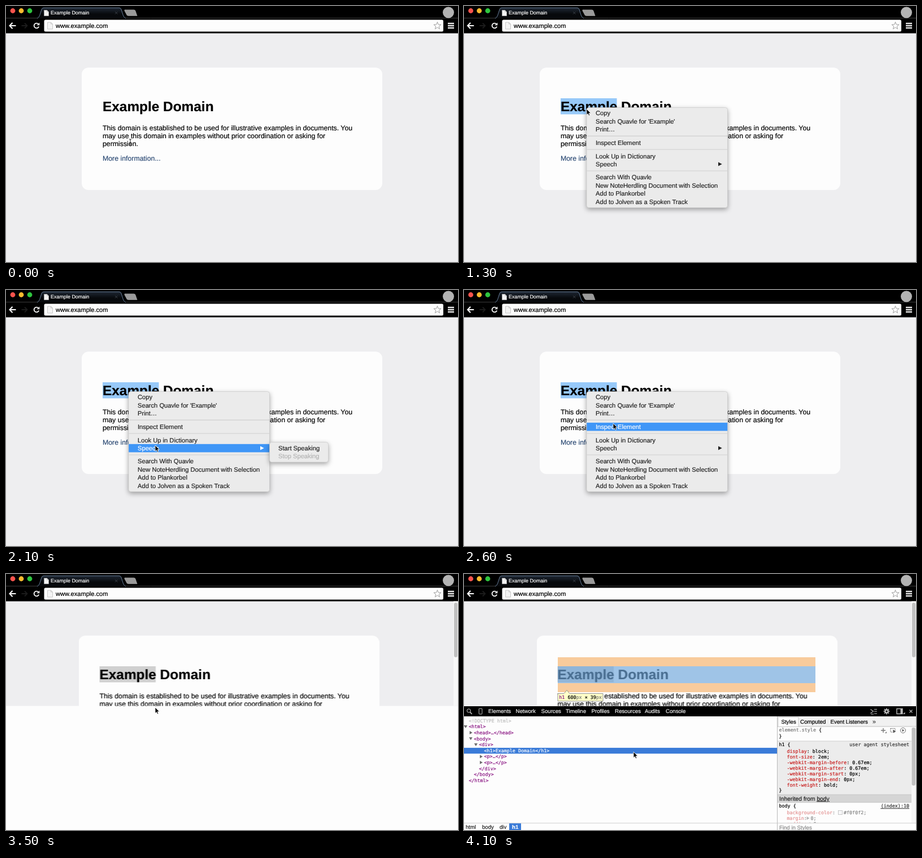
Write an HTML page that moves like this. It is 800 px wide and 455 px high and loops after 4.2 s.

```html
<!DOCTYPE html>
<html lang="en">
<head>
<meta charset="utf-8">
<title>Inspect Element</title>
<style>
  html, body { margin: 0; width: 100%; height: 100%; overflow: hidden; background: #eeeef0; }
  svg { display: block; width: 800px; height: 455px; }
  text {
    font-family: "Liberation Sans", Arial, sans-serif; white-space: pre;
    text-rendering: geometricPrecision;
    fill: currentColor; stroke: currentColor; stroke-width: .2px;
  }
  .mono { font-family: "DejaVu Sans Mono", Menlo, monospace; font-size: 8.37px; }
  .menu { filter: drop-shadow(0 3px 4px rgba(0, 0, 0, .35)); }
</style>
</head>
<body>
<svg id="stage" viewBox="0 0 800 455">
  <defs>
    <linearGradient id="tab" x2="0" y2="1">
      <stop offset="0" stop-color="#1f2834"/><stop offset=".6" stop-color="#07090c"/>
    </linearGradient>
    <clipPath id="styles"><path d="M554 253H800V442.5H554z"/></clipPath>
  </defs>
  <g id="page"></g>
  <g id="chrome"></g>
  <g id="blank"></g>
  <g id="tools"></g>
  <g id="menu"></g>
  <g id="sub"></g>
  <g id="ibeam">
    <path d="M-2-5.5Q0-5.5 0-4Q0-5.5 2-5.5M0-4V4M-2 5.5Q0 5.5 0 4Q0 5.5 2 5.5M-1.3 1.8H1.3" fill="none" stroke="#222"/>
  </g>
  <g id="arrow">
    <path d="M0 0V10.6L2.4 8.4 4 12 5.8 11.2 4.2 7.7H7.5z" fill="#000" stroke="#fff" stroke-width=".8"/>
  </g>
</svg>
<script>
const LOOP = 4200, TICK = 100;
const $ = id => document.getElementById(id);
const put = (id, ...parts) => { $(id).innerHTML = parts.flat().join(''); };

const rect = (x, y, w, h, fill, more = '') =>
  `<rect x="${x}" y="${y}" width="${w}" height="${h}" fill="${fill}" ${more}/>`;
const path = (d, fill, stroke = 'none', width = 1) =>
  `<path d="${d}" fill="${fill}" stroke="${stroke}" stroke-width="${width}"/>`;
const dot = (x, y, r, fill) => `<circle cx="${x}" cy="${y}" r="${r}" fill="${fill}"/>`;
const ring = (x, y, r, stroke) => `<circle cx="${x}" cy="${y}" r="${r}" fill="none" stroke="${stroke}"/>`;
const text = (x, y, s, size, color = '#000', more = '') =>
  `<text x="${x}" y="${y}" font-size="${size}" color="${color}" ${more}>${s}</text>`;
const mono = (x, y, s, color = '#000', more = '') =>
  `<text class="mono" x="${x}" y="${y}" color="${color}" ${more}>${s}</text>`;
const span = (s, color) => `<tspan color="${color}">${s}</tspan>`;
const esc = s => s.replace(/</g, '&lt;').replace(/>/g, '&gt;');

// Browser window
const docIcon = (x, y, w, h) =>
  path(`M${x} ${y}h${w - 3}l3 3v${h - 3}h${-w}z`, '#f4f4f4', '#b5b5b5', .7) +
  path(`M${x + w - 3} ${y}v3h3`, 'none', '#b5b5b5', .7);

const star = Array.from({ length: 10 }, (_, i) => {
  const r = i % 2 ? 2.9 : 6.8, a = i * Math.PI / 5;
  return `${(763.5 + r * Math.sin(a)).toFixed(1)} ${(35.2 - r * Math.cos(a)).toFixed(1)}`;
}).join('L');

put('chrome',
  rect(0, 0, 800, 48.5, '#000'),
  path('M0 21.5H800', 'none', '#3c3c3c'),
  dot(12, 8.5, 4.4, '#f9544d'), dot(27, 8.5, 4.4, '#fcbb2f'), dot(42, 8.5, 4.4, '#2fc63f'),
  path('M55 22Q58 21 59.5 17L63 6Q64 3.2 67 3.2H200Q203 3.2 204 6L207.5 17Q209 21 212 22', 'url(#tab)', '#7189a8', .9),
  docIcon(67.5, 7.5, 8, 10),
  text(79, 15.3, 'Example Domain', 8.97, '#fff'),
  path('M193 10l4.5 4.5m0-4.5l-4.5 4.5', 'none', '#3a4048'),
  path('M210 6.5H226Q228.5 6.5 229.3 8.5L232.5 17.8H217Q214 17.8 213 15L209.3 8z', '#9b9b9b'),
  path('M11.5 29.8L6.5 35L11.5 40.2M6.5 35H17.5', 'none', '#fff', 2.1),
  path('M33 30.5L37.5 35L33 39.5M27.5 35H37', 'none', '#1c1c1c', 1.8),
  path('M57.3 32A4.4 4.4 0 1 0 58.2 36.5', 'none', '#fff', 1.8),
  path('M59.3 29.5V34.3H54.5z', '#fff'),
  rect(67.5, 24.5, 706.5, 21, '#fdfdfd', 'rx="2.5"'),
  docIcon(73.5, 29, 9, 12),
  text(88, 39, 'www.example.com', 11.1),
  path(`M${star}z`, '#fff', '#909090', .9),
  path('M782 31H793M782 35H793M782 39H793', 'none', '#e6e6e6', 2.3),
  dot(783, 11.5, 10, '#b3b3b3'));

// Web page
const copy = [
  'This domain is established to be used for illustrative examples in documents. You',
  'may use this domain in examples without prior coordination or asking for',
  'permission.'
];
put('page',
  rect(134, 109.5, 532, 217.5, '#fdfdfd', 'rx="12"'),
  rect(171, 164, 99.5, 28.5, '#97c9f9', 'id="pick"'),
  text(171, 187.3, 'Example Domain', 24.4, '#000', 'font-weight="bold"'),
  copy.map((s, i) => text(171, 221.3 + i * 13.68, s, 12.32)),
  text(171, 274.7, 'More information...', 12.32, '#2c4a74'));

put('blank',
  rect(0, 234.5, 800, 221, '#fdfdfd'),
  rect(792, 48.5, 8, 186, '#f8f8f8'),
  rect(793, 51, 6, 97, '#c0c0c0', 'rx="3"'));

// Developer tools
const TAG = '#881280', PROP = '#c81c1c', BLUE = '#3a7bd8';

const tabs = [[43, 'Elements'], [91.5, 'Network'], [136.5, 'Sources'], [180, 'Timeline'],
  [225.5, 'Profiles'], [267, 'Resources'], [320, 'Audits'], [357, 'Console']];

// indent level, text, fold: 'o'pen, 'c'losed or none
const tree = [
  [0, '<!DOCTYPE html>', ''], [0, '<html>', 'o'], [1, '<head>…</head>', 'c'], [1, '<body>', 'o'],
  [2, '<div>', 'o'], [3, '<h1>Example Domain</h1>', ''], [3, '<p>…</p>', 'c'], [3, '<p>…</p>', 'c'],
  [2, '</div>', ''], [1, '</body>', ''], [0, '</html>', '']
];
const fold = (x, y, kind) =>
  kind === 'o' ? path(`M${x - 3} ${y - 2.2}h6l-3 5z`, '#6b6b6b') :
  kind === 'c' ? path(`M${x - 2} ${y - 3}v6l5-3z`, '#6b6b6b') : '';

const treeRow = ([level, s, kind], i) => {
  const x = 8.4 + level * 9.05, y = 260.6 + i * 10.64, on = i === 5;
  return (on ? rect(0, y - 4.9, 554, 10.4, BLUE) : '') + fold(x - 5.5, y, kind) +
    mono(x, y + 3, esc(s), on ? '#fff' : i ? TAG : '#bdbdbd');
};

const rules = ['display: block', 'font-size: 2em', '-webkit-margin-before: 0.67em',
  '-webkit-margin-after: 0.67em', '-webkit-margin-start: 0px', '-webkit-margin-end: 0px', 'font-weight: bold'];
const rule = (s, i) => {
  const [name, value] = s.split(':');
  return mono(571.5, 317.8 + i * 10, span(name, PROP) + ':' + value + ';');
};

const gear = dot(748, 244, 3.8, '#bbb') +
  path('M748 238.5V249.5M742.5 244H753.5M744.1 240.1L751.9 247.9M751.9 240.1L744.1 247.9', 'none', '#bbb', 1.7) +
  dot(748, 244, 1.5, '#000');

const highlight =
  rect(166, 148, 456, 16, 'rgba(246,178,107,.66)') +
  rect(166, 164, 456, 30, 'rgba(111,168,220,.66)') +
  rect(166, 194, 456, 16, 'rgba(246,178,107,.66)') +
  path('M166 212.5H177L182 206.5L187 212.5H246V226H166z', '#ffffc9', '#8a8a8a', .9) +
  mono(168.3, 222.3, span('h1', TAG) + ' 600' + span('px', '#777') + ' × 39' + span('px', '#777'));

const stylesPane =
  rect(554, 253, 246, 18, '#f1f1f1') +
  path('M554 271H800', 'none', '#bcbcbc') +
  rect(556, 254.5, 36, 17, '#fdfdfd', 'stroke="#c4c4c4" stroke-width=".8"') +
  text(561.5, 266.3, 'Styles', 9.65) + text(595, 266.3, 'Computed', 9.9) +
  text(648.5, 266.3, 'Event Listeners', 9.65) + text(723, 265.8, '»', 11, '#444') +
  mono(557.5, 280.3, span('element.style', '#777') + ' {') + mono(557.5, 291, '}') +
  path('M738 278H746M742 274V282', 'none', '#777', 1.4) + path('M748 280v3h-3z', '#777') +
  rect(755, 274.5, 8, 6.5, 'none', 'stroke="#555" stroke-dasharray="1.5 1"') +
  path('M759 276.5L764.5 280L761.5 280.5L760.5 283z', '#444') +
  ring(777, 278, 4.6, '#777') + path('M775.5 275.5V280.5L779.5 278z', '#666') +
  rect(554, 297, 238, 94.5, '#ececec') + path('M554 297H792', 'none', '#c4c4c4', .8) +
  mono(557.5, 306, 'h1 {') + mono(788, 306, 'user agent stylesheet', '#333', 'text-anchor="end"') +
  rules.map(rule).join('') + mono(557.5, 387, '}') +
  rect(554, 392, 238, 14, '#d5d5d5') +
  path('M554 392H792M554 406H792', 'none', '#bdbdbd', .8) +
  text(558, 402.8, 'Inherited from <tspan text-decoration="underline">body</tspan>', 10.3, '#222') +
  mono(557.5, 415.3, 'body {') +
  mono(788, 415.3, '(index):10', '#333', 'text-anchor="end" text-decoration="underline"') +
  '<g opacity=".48">' +
  mono(571.5, 427, span('background-color', PROP) + ':') +
  rect(662.5, 420.5, 7, 7, '#f0f0f2', 'stroke="#777" stroke-width=".8"') + mono(672, 427, '#f0f0f2;') +
  mono(571.5, 437, span('margin', PROP) + ':') + fold(608.5, 434, 'c') + mono(613.5, 437, '0;') +
  mono(571.5, 447, span('padding', PROP) + ':') + fold(613.5, 444, 'c') + mono(618.5, 447, '0;') +
  '</g>' +
  rect(792, 271.5, 8, 171, '#f6f6f6') + rect(792.5, 273, 6.5, 103, '#c0c0c0', 'rx="3"');

put('tools',
  highlight,
  rect(0, 235, 800, 18, '#000'),
  ring(8.5, 243, 3.2, '#ccc'),
  path('M10.8 245.5L14 249', 'none', '#ccc', 1.6),
  rect(26.5, 239, 5.5, 10, 'none', 'rx="1" stroke="#bbb"'),
  tabs.map(([x, s]) => text(x, 247.3, s, 9.65, '#f4f4f4')),
  path('M719.5 240.5L724.5 244L719.5 247.5M720 249H725M726 248H731M726 244H731M726 240.5H731', 'none', '#bbb', 1.1),
  gear,
  rect(766, 239.5, 10, 9, 'none', 'stroke="#bbb" stroke-width="1.4"'), rect(772.5, 239.5, 3.5, 9, '#bbb'),
  path('M777 249h3.5v-3.5z', '#bbb'),
  path('M788.5 241.5l5 5m0-5l-5 5', 'none', '#bbb', 1.1),
  rect(0, 253, 800, 202, '#fdfdfd'),
  tree.map(treeRow),
  `<g clip-path="url(#styles)">${stylesPane}</g>`,
  path('M554.5 253V455', 'none', '#b8b8b8'),
  path('M0 442.8H800', 'none', '#c4c4c4', .8),
  rect(80, 443.2, 21, 12, BLUE),
  [[3, 'html'], [32, 'body'], [63, 'div']].map(([x, s]) => text(x, 453, s, 9.65, '#222')),
  text(85, 453, 'h1', 9.65, '#fff', 'font-weight="bold"'),
  text(558, 453.5, 'Find in Styles', 9.65, '#8c8c8c'),
  rect(0, 253.5, 4, 201.5, '#fdfdfd', 'id="edge"'));

// Context menu
const items = [[190, 'Copy'], [204.6, "Search Quavle for 'Example'"], [219, 'Print…'],
  [243, 'Inspect Element'], [266.6, 'Look Up in Dictionary'], [281, 'Speech'],
  [304.3, 'Search With Quavle'], [318.8, 'New NoteHerdling Document with Selection'],
  [333.3, 'Add to Plankorbel'], [347.8, 'Add to Jolven as a Spoken Track']];
const SPEECH = 5;

const box = (x, y, w, h) =>
  rect(x, y, w, h, '#ebebeb', 'class="menu" rx="4" stroke="#c4c4c4" stroke-width=".6"');

put('menu',
  box(217, 180.5, 249.5, 178),
  path('M217.5 231.2H466M217.5 255H466M217.5 293H466', 'none', '#d0d0d0', 1.2),
  items.map(([y, s], i) => `<g class="item">${rect(217.2, y - 7.2, 249, 14.6, '#3f96f7', 'opacity="0"')}` +
    text(233, y + 4, s, 11.15, 'inherit') +
    (i === SPEECH ? path(`M450 ${y - 3.6}v7.2l6.7-3.6z`, 'currentColor') : '') + '</g>'));

put('sub',
  box(466.5, 270.5, 104, 35.5),
  text(482, 285, 'Start Speaking', 11.15, '#222'),
  text(482, 299.4, 'Stop Speaking', 11.15, '#b3b3b3'));

// Motion
const track = [[0, 220, 242], [200, 220, 242], [700, 217, 183], [1400, 217, 183], [1900, 264, 276],
  [2300, 264, 276], [2600, 264, 237], [3500, 264, 237], [3600, 271, 243], [3700, 284, 256],
  [4100, 300, 316], [LOOP, 300, 316]];

function pointer(t) {
  const i = track.findIndex(p => p[0] > t);
  const [t0, x0, y0] = track[i - 1], [t1, x1, y1] = track[i];
  const u = (t - t0) / (t1 - t0), s = u * u * (3 - 2 * u);
  return [x0 + (x1 - x0) * s, y0 + (y1 - y0) * s];
}

function hovered(t) {
  if (t < 1300 || t >= 2700) return -1;
  const [x, y] = pointer(t);
  return x < 219 ? -1 : items.findIndex(([c]) => Math.abs(y - c) < 7.2);
}

// Holds each value until the next entry of the table.
function steps(el, prop, table) {
  const frames = table.map(([t, v]) => ({ offset: t / LOOP, [prop]: v, easing: 'step-end' }));
  frames.push({ offset: 1, [prop]: table[table.length - 1][1] });
  el.animate(frames, { duration: LOOP, iterations: Infinity });
}
const ticks = fn => Array.from({ length: LOOP / TICK }, (_, i) => [i * TICK, fn(i * TICK)]);
const place = t => `translate(${pointer(t).map(v => v.toFixed(1) + 'px').join(',')})`;

steps($('ibeam'), 'transform', ticks(place));
steps($('arrow'), 'transform', ticks(place));
steps($('ibeam'), 'opacity', [[0, 1], [1300, 0]]);
steps($('arrow'), 'opacity', [[0, 0], [1300, 1]]);
steps($('pick'), 'opacity', [[0, 0], [900, 1]]);
steps($('pick'), 'fill', [[0, '#97c9f9'], [3300, '#d0d0d0']]);
steps($('menu'), 'opacity', [[0, 0], [1300, 1], [2800, .65], [2900, .25], [3000, 0]]);
steps($('sub'), 'opacity', [[0, 0], [2000, 1], [2500, 0]]);
steps($('page'), 'transform', [[0, 'translate(0px,0px)'], [3300, 'translate(-5.5px,0px)']]);
steps($('blank'), 'opacity', [[0, 0], [3300, 1]]);
steps($('tools'), 'opacity', [[0, 0], [3600, 1]]);
steps($('edge'), 'opacity', [[0, 1], [3800, 0]]);
document.querySelectorAll('.item').forEach((el, i) => {
  steps(el, 'color', ticks(t => hovered(t) === i ? '#fff' : '#222'));
  steps(el.firstChild, 'opacity', ticks(t => +(hovered(t) === i)));
});
</script>
</body>
</html>
```
